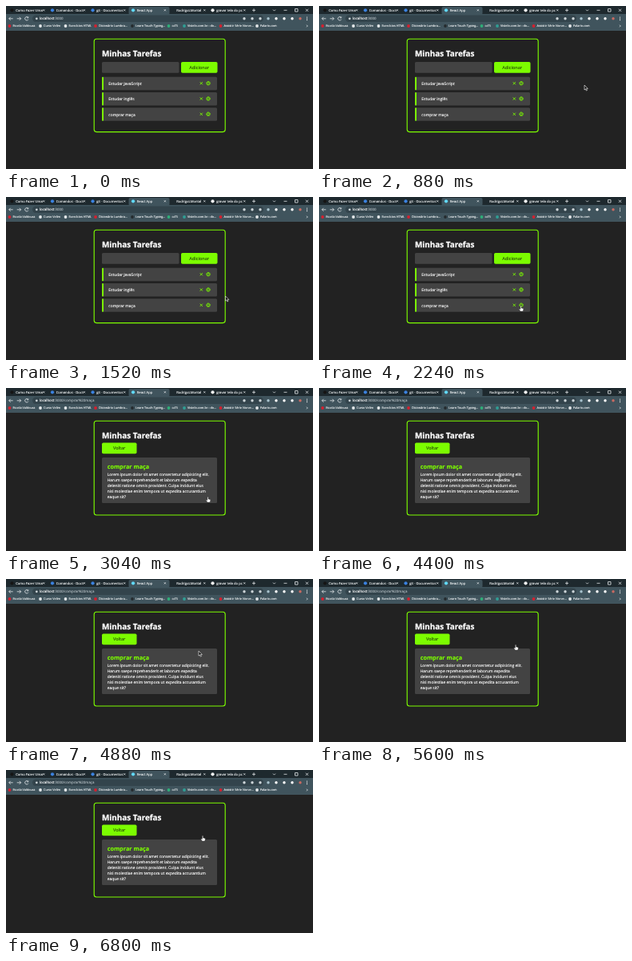
Write an HTML page that moves like this. It is 384 px wide and 204 px high and loops after 6880 ms.

```html
<!DOCTYPE html>
<html lang="pt-BR">
<head>
<meta charset="utf-8">
<title>Minhas Tarefas</title>
<style>
  html, body { margin: 0; width: 100%; height: 100%; overflow: hidden; background: #222; }
  svg { display: block; width: 384px; height: 204px; }
  text {
    font-family: "Open Sans", "Noto Sans", sans-serif; color: #fff; fill: currentColor;
    stroke: currentColor; stroke-width: .14; text-rendering: geometricPrecision;
  }
  .tab { font-size: 4.2px; color: #eef1f2; }
  .mark { font-size: 3.8px; color: #eef1f2; }
  .url { font-size: 4.4px; }
  .body { font-size: 4.95px; }
  .title { font-size: 9.9px; font-weight: 700; stroke-width: .25; }
  .name { font-size: 7.3px; font-weight: 700; color: #7cfc00; }
  .button { font-size: 5.6px; color: #2c5208; text-anchor: middle; }
  .line { fill: none; stroke: #e4e8ea; stroke-width: .8; }
  .green { fill: none; stroke: #7cfc00; }
</style>
</head>
<body>
<svg id="stage" viewBox="0 0 384 204"></svg>
<script>
const LOOP = 6880, STEP = 80, OPEN_AT = 3040;
const GREEN = '#7cfc00', PANEL = '#434343', STRIP = '#1e292e', TOOLBAR = '#40545d', FIELD = '#33444c';

const rect = (x, y, w, h, fill, r = 0) =>
  `<rect x="${x}" y="${y}" width="${w}" height="${h}" rx="${r}" fill="${fill}"/>`;
const dot = (x, y, r, fill) => `<circle cx="${x}" cy="${y}" r="${r}" fill="${fill}"/>`;
const text = (x, y, s, cls) => `<text x="${x}" y="${y}" class="${cls}">${s}</text>`;
const path = (d, cls = 'line', extra = '') => `<path d="${d}" class="${cls}" ${extra}/>`;
const cross = (x, y, r) => `M${x - r} ${y - r}l${2 * r} ${2 * r}m0 ${-2 * r}l${-2 * r} ${2 * r}`;
const address = rest => text(42, 17.3, `localhost<tspan color="#a9b4b9">${rest}</tspan>`, 'url');

function browser() {
  const tabs = [
    [7.5, 'Como Fazer Uma', '#151515'], [58, 'Comandos - Docs', '#3b82e0'],
    [108.5, 'git - Documentos', '#3b82e0'], [159, 'React App', '#61dafb'],
    [208.5, 'RodrigoLMontal', STRIP], [258.5, 'gravar tela do pc', '#f2f2f2']
  ];
  const marks = [
    [4.5, 'Escola Valdoura', '#d3202f'], [43, 'Curso Velim', '#e4e8ea'],
    [74.5, 'Exercícios HTML', '#e4e8ea'], [112, 'Dicionário Lumbra…', '#d3202f'],
    [158, 'Learn Touch Typing…', '#252b2e'], [203.5, 'ccf3', '#2fae78'],
    [223, 'Vistelo.com.br - do…', '#2f9f95'], [268.5, 'Assistir Série Norve…', '#d3202f'],
    [314, 'Falario.com', '#e4e8ea']
  ];
  const buttons = ['#cdd5d8', '#cdd5d8', '#cdd5d8', '#a9c3ce', '#fff', '#fff', '#fff', '#c96a62'];
  let out = rect(0, 0, 384, 10, STRIP) + rect(0, 10, 384, 21, TOOLBAR) +
    rect(153.5, 1, 51, 10, TOOLBAR, 2) + rect(33, 11.5, 289, 8.5, FIELD, 4.2);
  for (const [x, label, color] of tabs)
    out += dot(x, 5.3, 2.1, color) + text(x + 4.7, 6.8, label, 'tab') + path(cross(x + 39.8, 5.3, 1));
  for (const [x, label, color] of marks)
    out += dot(x, 25, 1.9, color) + text(x + 4, 26.4, label, 'mark');
  buttons.forEach((color, i) => out += dot(298 + i * 10, 15.8, 1.7, color));
  for (const y of [14, 15.8, 17.6]) out += dot(376.5, y, .6, '#fff');
  return out + dot(38.3, 15.8, 1.4, '#cdd5d8') +
    path('M310 3.3v4m-2-2h4M334 4.6l1.5 1.5 1.5-1.5M347.5 5.3h4M361.5 3.5h3.5v3.5h-3.5z' + cross(376.5, 5.3, 1.6)) +
    path('M8.7 15.8h-5l2-2m-2 2l2 2M13.7 15.8h5l-2-2m2 2l-2 2M27.7 14.5a2.2 2.2 0 1 0 .2 2.2m-.1-3.4v1.6h-1.6') +
    path('M376 23.7l1.3 1.3-1.3 1.3');
}

function card(height) {
  return `<rect x="110.2" y="41.2" width="164" height="${height}" rx="3" class="green" stroke-width="1.15"/>` +
    text(120, 62.8, 'Minhas Tarefas', 'title');
}

function gear(x, y) {
  return `<circle cx="${x}" cy="${y}" r="2.3" class="green" stroke-width="1" stroke-dasharray="1.1 .35"/>` +
    `<circle cx="${x}" cy="${y}" r="1.4" class="green" stroke-width=".8"/>`;
}

function list() {
  let out = card(116.4) + rect(120, 70, 96.5, 13.7, PANEL, 1.5) +
    rect(219, 70, 45.5, 13.7, GREEN, 1.8) + text(241.7, 79, 'Adicionar', 'button');
  ['Estudar JavaScript', 'Estudar inglês', 'comprar maça'].forEach((task, i) => {
    const y = 88.7 + i * 19.3;
    out += rect(120, y, 144, 16.5, PANEL, 1.5) + rect(120, y, 2, 16.5, GREEN, .8) +
      text(128.3, y + 10.2, task, 'body') +
      path(cross(244.3, y + 8, 1.6), 'green', 'stroke-width=".9"') + gear(253, y + 8);
  });
  return out + address(':3000');
}

function detail() {
  const lines = [
    'Lorem ipsum dolor sit amet consectetur adipisicing elit.',
    'Harum saepe reprehenderit et laborum expedita',
    'deleniti ratione omnis provident. Culpa incidunt eius',
    'nisi molestiae enim tempora ut expedita accusantium',
    'eaque sit?'
  ];
  return card(117.8) + rect(120, 68.5, 43.5, 13.7, GREEN, 1.8) + text(141.7, 77.2, 'Voltar', 'button') +
    rect(120, 87, 144, 57, PANEL, 1.5) + text(126.7, 100.7, 'comprar maça', 'name') +
    lines.map((s, i) => text(126.7, 109.7 + i * 7, s, 'body')).join('') +
    address(':3000/comprar%20maça');
}

const pointers = {
  arrow: path('M0 0v6l1.4-1.2 1 2.2 1-.5-1-2.1h1.9z', '', 'fill="#111" stroke="#fff" stroke-width=".6"'),
  hand: path('M-.6 0q.6-.7 1.2 0v2.4l2.3.6q.6.3.4 1l-.6 2.5h-3.3l-1.7-2.4q.2-1 1.7-.1z', '',
    'fill="#fff" stroke="#222" stroke-width=".4"'),
  beam: path('M-1.2-2.5q1 0 1.2.5q.2-.5 1.2-.5M0-2v4M-1.2 2.5q1 0 1.2-.5q.2.5 1.2.5')
};

// Pointer waypoints: time, x, y
const route = [
  [640, 379, 82], [880, 332, 99], [1280, 310, 115], [1760, 239, 133], [2000, 244, 135],
  [2160, 244, 135], [2240, 252.5, 136.5], [3680, 252.5, 136.5], [3840, 252.5, 135],
  [4320, 227, 115], [4400, 226, 113], [5040, 246, 82.5]
];

function pointerAt(t) {
  const next = route.findIndex(p => p[0] > t);
  if (next < 0) return route.at(-1).slice(1);
  const [t0, x0, y0] = route[next - 1], [t1, x1, y1] = route[next];
  const k = (t - t0) / (t1 - t0);
  return [x0 + (x1 - x0) * k, y0 + (y1 - y0) * k];
}

function pointerKind(t, x, y) {
  if (t < OPEN_AT) return x < 256 && y > 130 ? 'hand' : 'arrow';
  if (t < 3680 || t >= 5040) return 'hand';
  return y > 103 ? 'beam' : 'arrow';
}

stage.innerHTML = rect(0, 0, 384, 204, '#222') + browser() +
  `<g id="listPage">${list()}</g><g id="detailPage">${detail()}</g><g id="pointer"></g>`;
const [listPage, detailPage, pointer] =
  ['listPage', 'detailPage', 'pointer'].map(id => document.getElementById(id));

function draw(now) {
  const t = Math.floor(now % LOOP / STEP) * STEP;
  const opened = t >= OPEN_AT;
  listPage.style.display = opened ? 'none' : '';
  detailPage.style.display = opened ? '' : 'none';
  pointer.style.display = t < 640 ? 'none' : '';
  if (t >= 640) {
    const [x, y] = pointerAt(t);
    pointer.setAttribute('transform', `translate(${x} ${y})`);
    pointer.innerHTML = pointers[pointerKind(t, x, y)];
  }
  requestAnimationFrame(() => draw(performance.now()));
}
draw(performance.now());
</script>
</body>
</html>
```
